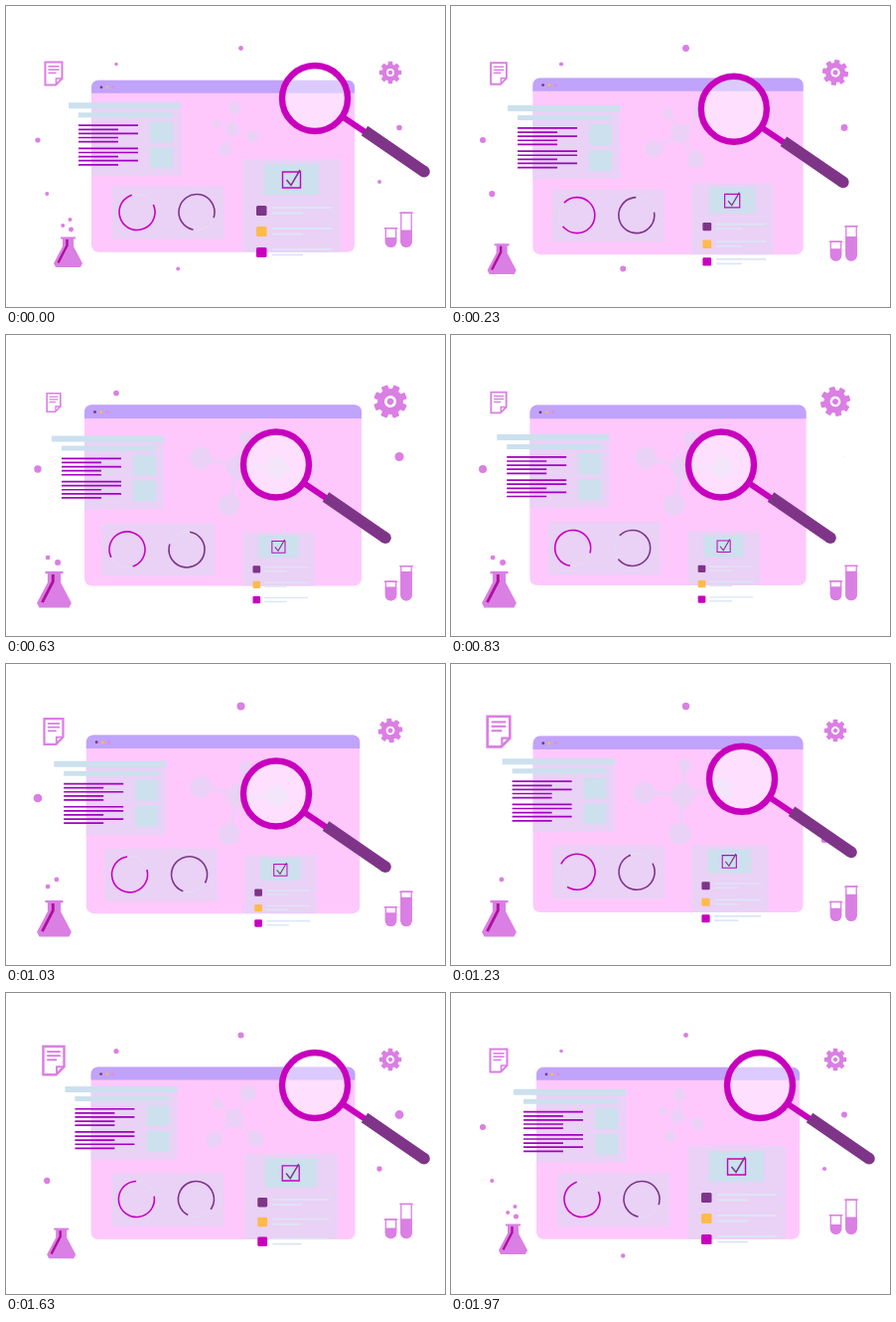
An HTML page with a canvas that plays this animation: 442x303 px, repeating every 2.01 s.

```html
<!DOCTYPE html>
<html>
<head>
<meta charset="utf-8">
<style>
html, body { margin: 0; width: 100%; height: 100%; overflow: hidden; background: #fff; }
canvas { display: block; }
</style>
</head>
<body>
<canvas id="stage" width="442" height="303"></canvas>
<script>
const c = document.getElementById('stage').getContext('2d');
const LOOP = 2010, RAD = Math.PI / 180;
const PINK = '#fec8fc', BAR = '#c0a3fa', PANEL = '#ead1f6', BLUE = '#cce0ee', PALE = '#dce6f4';
const ORCHID = '#da7fe3', MAGENTA = '#c800be', PURPLE = '#7e3588', YELLOW = '#fdbb4a', LINE = '#a000bd';
let now = 0;

// Eased progress 0..1 between two times
function ease(from, to) {
  const u = Math.min(1, Math.max(0, (now - from) / (to - from)));
  return u * u * (3 - 2 * u);
}

// Rises from a to b, holds, falls from d to e
const pulse = (a, b, d, e) => ease(a, b) - ease(d, e);

// Zero at both ends of a move, one halfway
const bow = p => 4 * p * (1 - p);

function rect(x, y, w, h, color, r = 0) {
  c.fillStyle = color;
  c.beginPath();
  c.roundRect(x, y, w, h, r);
  c.fill();
}

function dot(x, y, r, color) {
  if (r < 0.2) return;
  c.fillStyle = color;
  c.beginPath();
  c.arc(x, y, r, 0, 7);
  c.fill();
}

function path(points, color, width, close) {
  c.strokeStyle = color;
  c.lineWidth = width;
  c.beginPath();
  points.forEach(p => c.lineTo(...p));
  if (close) c.closePath();
  c.stroke();
}

function arc(x, y, r, from, to, color, width) {
  c.strokeStyle = color;
  c.lineWidth = width;
  c.beginPath();
  c.arc(x, y, r, from * RAD, to * RAD);
  c.stroke();
}

function group(x, y, scale, draw, angle = 0) {
  c.save();
  c.translate(x, y);
  c.rotate(angle * RAD);
  c.scale(scale, scale);
  draw();
  c.restore();
}

function appWindow(zoom) {
  const s = 1 + .053 * zoom, cx = 218.5, cy = 161.3;
  group(cx, cy, s, () => {
    rect(-132.5, -86.5, 265, 173, PINK, 7);
    rect(-132.5, -86.5, 265, 13, BAR, [7, 7, 0, 0]);
    [PURPLE, YELLOW, '#e58ad8'].forEach((color, i) => dot(-122.5 + i * 6, -79.5, 1.4, color));
  });
  return [cx - 132.5 * s, cy - 86.5 * s, 265 * s, 173 * s];
}

// Panels show only where they lie over the window
function panel(frame, x, y, w, h) {
  c.save();
  c.beginPath();
  c.roundRect(...frame, 7);
  c.clip();
  rect(x, y, w, h, PANEL);
  c.restore();
}

function molecule() {
  const grow = pulse(0, 450, 1250, 1950), turn = pulse(0, 480, 1030, 1950);
  group(228 + 6 * turn, 124 + 9 * turn, .56 + .44 * grow, () => {
    dot(0, 0, 12, PANEL);
    [-14, 90, 180, 270].forEach(angle => {
      const short = angle === 270, len = short ? 30 : 39;
      const x = len * Math.cos(angle * RAD), y = len * Math.sin(angle * RAD);
      path([[0, 0], [x, y]], PANEL, 3);
      dot(x, y, short ? 6.5 : 11, PANEL);
    });
  }, -70 + 84 * turn);
}

function article(frame) {
  const x = 63 - 17 * pulse(0, 580, 750, 2000);
  const y = 97.7 + 4 * Math.cos(2 * Math.PI * (now - 530) / LOOP);
  panel(frame, x, y + 5, 113, 69);
  rect(x, y, 113, 6, BLUE, 1);
  rect(x + 10, y + 10, 95, 5, BLUE);
  rect(x + 82, y + 19, 23, 21, BLUE);
  rect(x + 82, y + 45, 23, 21, BLUE);
  [...'LSLSSLLSLS'].forEach((kind, i) => {
    const top = y + 22 + i * 4.1 + (i > 4 ? 2.7 : 0);
    rect(x + 10, top, kind === 'L' ? 60 : 40, 1.7, LINE);
  });
}

function charts(frame, zoom) {
  const x = 107 - 10 * zoom;
  const y = 181.5 + 8.5 * pulse(0, 560, 580, 1500);
  const turn = -180 * ease(0, 400) - 540 * ease(600, 1750);
  panel(frame, x, y, 113, 53);
  [[25, -66, MAGENTA], [85, 60, PURPLE]].forEach(([dx, gap, color]) => {
    arc(x + dx, y + 26, 18, 0, 360, '#e4daf3', 1.5);
    arc(x + dx, y + 26, 18, gap + turn + 41, gap + turn + 319, color, 1.6);
  });
}

function checklist(frame, sink, shrink) {
  const x = 239 + 3.5 * bow(sink), y = 154 + 44 * sink, s = 1 - .27 * shrink;
  panel(frame, x, y, 98 * s, 105 * s);
  group(x, y, s, () => {
    rect(21, 5, 55, 31, BLUE);
    path([[39.5, 13], [57.5, 13], [57.5, 29], [39.5, 29]], MAGENTA, 1.4, true);
    path([[43.5, 21], [48, 26.5], [57, 11]], PURPLE, 1.5);
    [PURPLE, YELLOW, MAGENTA].forEach((color, i) => {
      const top = 47 + i * 21;
      rect(13, top, 10.5, 10, color, 1.5);
      rect(29, top + 1, 60, 2, PALE);
      rect(29, top + 6.5, 31, 2, PALE);
    });
  });
}

function note() {
  const s = 1 - .2 * pulse(0, 600, 650, 1000) + .33 * pulse(900, 1230, 1450, 1970);
  group(48, 68, s, () => {
    path([[-8.5, -11.5], [8.5, -11.5], [8.5, 5], [2, 11.5], [-8.5, 11.5]], ORCHID, 2, true);
    path([[8.5, 5], [2.5, 5], [2.5, 11]], ORCHID, 1.6);
    [11, 11, 8].forEach((w, i) => rect(-5.5, -8 + i * 3.3, w, 1.6, ORCHID));
  });
}

function gear() {
  const u = Math.min(1, now / 1200);
  group(387, 67, 1 + .5 * Math.sin(Math.PI * u) ** 2, () => {
    dot(0, 0, 8.6, ORCHID);
    for (let i = 0; i < 8; i++) {
      rect(-2.3, -11.2, 4.6, 5, ORCHID, .8);
      c.rotate(Math.PI / 4);
    }
    dot(0, 0, 4, '#fff');
    dot(0, 0, 2.2, ORCHID);
  }, 45 * u);
}

function flask() {
  const move = pulse(0, 320, 1300, 1950), grow = pulse(200, 550, 1250, 1600);
  group(62.5 - 14 * move, 248 + 8.5 * move, 1 + .2 * grow, () => {
    rect(-7.5, -15.5, 15, 2, ORCHID);
    c.beginPath();
    [[-5.5, -15], [5.5, -15], [5.5, -6], [14.5, 11], [12.5, 15], [-12.5, 15], [-14.5, 11], [-5.5, -6]]
      .forEach(p => c.lineTo(...p));
    c.fill();
    path([[-1, -13], [-1, -7], [-10, 10.5]], '#b0109f', 2.4);
    const bubble = (x, y, r, from, to) => {
      const seen = 1 - pulse(0, 150, 1750, 1900) + pulse(from - 100, from, to, to + 100);
      dot(x, y, r * seen, ORCHID);
    };
    bubble(-5.3, -27, 2, 550, 1080);
    bubble(2, -33, 2, 950, 1400);
    bubble(3, -23, 2.5, 550, 850);
  });
}

function tube(x, y, w, h, level) {
  const round = [0, 0, w / 2, w / 2];
  c.save();
  c.beginPath();
  c.roundRect(x, y, w, h, round);
  c.clip();
  rect(x, y + level, w, h, ORCHID);
  c.restore();
  c.strokeStyle = ORCHID;
  c.lineWidth = 1.3;
  c.beginPath();
  c.roundRect(x + .6, y + .6, w - 1.2, h - 1.2, round);
  c.stroke();
  rect(x - 1, y, w + 2, 1.4, ORCHID);
}

function tubes(sink, shrink) {
  const y = 24.5 * sink;
  tube(381.7, 223 + y, 11.6, 20, 10 - 4 * shrink);
  tube(397.2, 207.5 + y, 11.6, 35.5, 18 - 12 * shrink);
}

// Specks swell until they pop, then come back large and settle
function specks() {
  [
    [236.5, 42.5, 2.4, 380, 980],
    [111, 58.5, 1.7, 680, 1500],
    [32, 135, 2.6, 1060, 1850],
    [41.3, 189, 2, 300, 1550],
    [173.2, 264.5, 1.9, 300, 1850],
    [396, 122.5, 2.8, 720, 1550],
    [376, 177, 2, 60, 1180]
  ].forEach(([x, y, r, gone, back]) => {
    const swell = now < back - 130 ? now / gone : (LOOP - now) / (LOOP - back);
    const seen = 1 - pulse(gone, gone + 130, back - 130, back);
    dot(x, y, r * (1 + .7 * swell) * seen, ORCHID);
  });
}

function magnifier() {
  const out = ease(0, 500), home = ease(1030, 1500), p = out - home;
  const x = 311 - 39 * p - 9 * bow(out) + 6 * bow(home);
  const y = 93 + 37.5 * p - 6 * bow(out);
  group(x, y, 1, () => {
    dot(0, 0, 33, 'rgba(255,255,255,.42)');
    path([[27, 18], [53, 35.5]], MAGENTA, 6);
    arc(0, 0, 33, 0, 360, MAGENTA, 6.4);
    path([[50, 32.5], [110, 73.7]], PURPLE, 11.6);
    dot(110, 73.7, 5.8, PURPLE);
  });
}

function draw() {
  now = performance.now() % LOOP;
  c.clearRect(0, 0, 442, 303);
  const zoom = pulse(0, 450, 650, 1800);
  const sink = pulse(0, 430, 750, 1950);
  const shrink = pulse(0, 410, 950, 1920);
  const frame = appWindow(zoom);
  molecule();
  article(frame);
  charts(frame, zoom);
  checklist(frame, sink, shrink);
  note();
  gear();
  flask();
  tubes(sink, shrink);
  specks();
  magnifier();
  requestAnimationFrame(draw);
}
draw();
</script>
</body>
</html>
```
